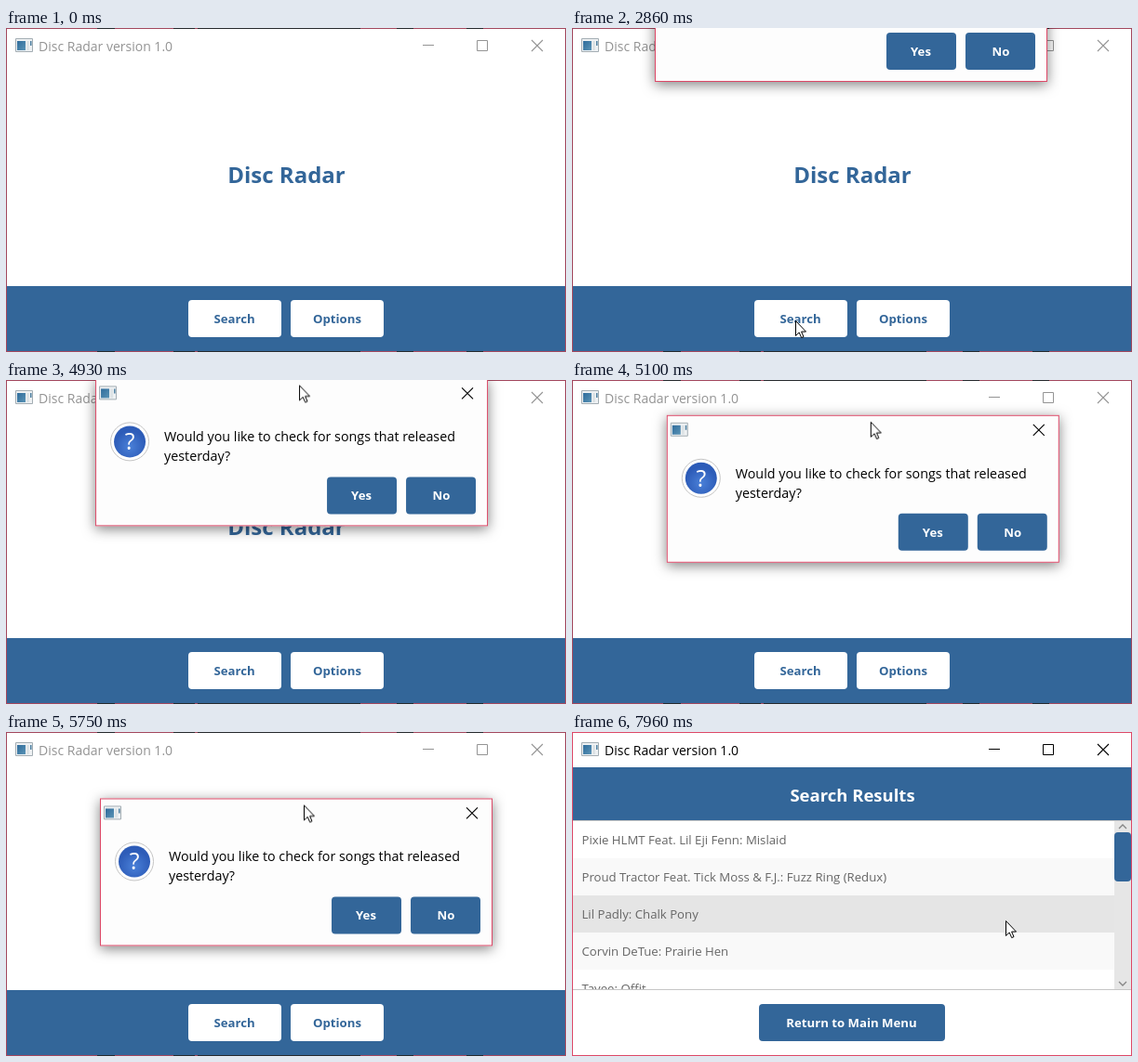
These frames come from a looping animation (602 px wide and 349 px high, 8 s). An HTML page:

```html
<!DOCTYPE html>
<html lang="en">
<head>
<meta charset="utf-8">
<title>Disc Radar</title>
<style>
html, body { margin: 0; width: 100%; height: 100%; overflow: hidden; background: #fff; }
svg { display: block; width: 602px; height: 349px; }
text { font-family: "Open Sans", "Noto Sans", sans-serif; }
.bold { font-weight: 700; font-size: 13.2px; text-anchor: middle; }
.blue { fill: #336699; }
.white { fill: #fff; }
.line { fill: none; stroke: currentColor; }
.rows text { font-size: 13.2px; fill: #666; }

.chrome, .edge, .results, .drag, .fade, .cursor { animation: 8s linear infinite; }
.chrome { animation-name: chrome; }
.edge { animation-name: edge; }
.results { animation-name: results; }
.drag { animation-name: drag; }
.fade { animation-name: fade; transform-origin: 211px 79px; }
.cursor { animation-name: cursor; }

@keyframes chrome {
  0%, 23.49% { color: #949494; }
  23.5%, 30.875% { color: #000; }
  34.5%, 91.87% { color: #949494; }
  92.75%, 100% { color: #000; }
}
@keyframes edge {
  0%, 23.49% { opacity: 0; }
  23.5%, 30.875% { opacity: 1; }
  34.5%, 91.87% { opacity: 0; }
  92.5%, 100% { opacity: 1; }
}
@keyframes results {
  0%, 91.87% { visibility: hidden; }
  91.875%, 100% { visibility: visible; }
}
@keyframes fade {
  0%, 30.8% { opacity: 0; transform: scale(.92); animation-timing-function: ease-out; }
  34.5%, 91.8% { opacity: 1; transform: none; }
  92.75%, 100% { opacity: 0; transform: scale(.96); }
}
@keyframes drag {
  0%, 59.5% { transform: translate(89px, -101px); animation-timing-function: cubic-bezier(.35, 0, .75, .75); }
  61.625% { transform: translate(96px, -2px); animation-timing-function: cubic-bezier(.2, .5, .6, .9); }
  65.875% { transform: translate(104px, 53px); animation-timing-function: ease-out; }
  68.375%, 69.5% { transform: translate(101px, 68px); }
  72.25%, 100% { transform: translate(101px, 72px); }
}
@keyframes cursor {
  0%, 12.7% { transform: translate(249px, 351px); animation-timing-function: cubic-bezier(.3, .4, .5, 1); }
  19.125%, 42.9% { transform: translate(240px, 315px); animation-timing-function: cubic-bezier(.5, .1, .8, .9); }
  46.1% { transform: translate(281px, 1px); }
  46.375% { transform: translate(285px, -24px); }
  47.5%, 59.5% { transform: translate(308px, -94px); animation-timing-function: cubic-bezier(.35, 0, .75, .75); }
  61.625% { transform: translate(315px, 5px); animation-timing-function: cubic-bezier(.2, .5, .6, .9); }
  65.875% { transform: translate(323px, 60px); animation-timing-function: ease-out; }
  68.375%, 69.5% { transform: translate(320px, 75px); }
  72.25%, 77.1% { transform: translate(320px, 79px); animation-timing-function: cubic-bezier(.4, .2, .5, 1); }
  80%, 81.6% { transform: translate(509px, 210px); animation-timing-function: ease-in-out; }
  87.625%, 97% { transform: translate(492px, 203px); animation-timing-function: ease-in-out; }
  99.5%, 100% { transform: translate(466px, 203px); }
}
</style>
</head>
<body>
<svg viewBox="0 0 602 349">
  <defs>
    <linearGradient id="pane" x2="1" y2="1">
      <stop stop-color="#2f6c9c"/><stop offset="1" stop-color="#5a93b5"/>
    </linearGradient>
    <radialGradient id="ball" cy=".65">
      <stop stop-color="#4a80d8"/><stop offset="1" stop-color="#2d5cb8"/>
    </radialGradient>
    <clipPath id="list"><path d="M1 96H583V277H1Z"/></clipPath>
    <g id="icon">
      <path d="M.5 .5H18.5V14.5H.5Z" fill="#eef1f3" stroke="#a3adb3"/>
      <path d="M2 3H11V13H2Z" fill="url(#pane)"/>
      <path d="M12 3H15V13H12Z" fill="#dde3e6"/>
      <path d="M16 3H17.5V8H16Z" fill="#4d7fa0"/>
    </g>
    <path id="cross" class="line" stroke-width="1.1" d="M-6 -6L6 6M6 -6L-6 6"/>
  </defs>

  <rect class="white" width="602" height="349"/>

  <g class="chrome">
    <use href="#icon" x="10" y="11"/>
    <text x="35" y="24.5" font-size="14" fill="currentColor">Disc Radar version 1.0</text>
    <path class="line" d="M448 18.5H460M506.5 13.5H517.5V24.5H506.5Z"/>
    <use href="#cross" x="571" y="19"/>
  </g>

  <g class="home">
    <text class="bold blue" x="301.5" y="167" style="font-size:24px">Disc Radar</text>
    <rect class="blue" y="278" width="602" height="71"/>
    <rect class="white" x="196" y="293" width="100" height="40" rx="4"/>
    <rect class="white" x="306" y="293" width="100" height="40" rx="4"/>
    <text class="bold blue" x="245.5" y="318">Search</text>
    <text class="bold blue" x="356" y="318">Options</text>
  </g>

  <g class="results">
    <rect class="white" y="38" width="602" height="311"/>
    <rect class="blue" y="38" width="602" height="57"/>
    <text class="bold white" x="301.5" y="75" style="font-size:18.5px">Search Results</text>
    <g class="rows" clip-path="url(#list)">
      <path fill="#f9f9f9" d="M1 136H583V176H1ZM1 216H583V256H1Z"/>
      <path fill="#e5e5e5" d="M1 176H583V216H1Z"/>
      <text x="10.5" y="121">Pixie HLMT Feat. Lil Eji Fenn: Mislaid</text>
      <text x="10.5" y="161">Proud Tractor Feat. Tick Moss &amp; F.J.: Fuzz Ring (Redux)</text>
      <text x="10.5" y="201">Lil Padly: Chalk Pony</text>
      <text x="10.5" y="241">Corvin DeTue: Prairie Hen</text>
      <text x="10.5" y="281">Tavee: Offit</text>
    </g>
    <path fill="#e6e6e6" d="M583 96H601V277H583Z"/>
    <rect class="blue" x="583" y="108" width="18" height="53" rx="4"/>
    <path fill="none" stroke="#858585" stroke-width="1.3" d="M588 104L592 100L596 104M588 269L592 273L596 269"/>
    <path fill="none" stroke="#c6c6c6" d="M1 95.5H601M1 277.5H601"/>
    <rect class="blue" x="201" y="293" width="200" height="40" rx="4"/>
    <text class="bold white" x="300.5" y="318">Return to Main Menu</text>
  </g>

  <g fill="none">
    <rect x=".5" y=".5" width="601" height="348" stroke="#a3475d"/>
    <path stroke="#26292d" d="M98 .5H117M180 .5H203M206 .5H381M420 .5H438M495 .5H513M98 348.5H117M180 348.5H203M206 348.5H381M420 348.5H438M495 348.5H513"/>
    <rect class="edge" x=".5" y=".5" width="601" height="348" stroke="#dd4867"/>
  </g>

  <g class="drag">
    <g class="fade">
      <rect width="422" height="159" fill="#fdfdfd" style="filter:drop-shadow(0 3px 7px rgba(0,0,0,.5))"/>
      <rect x=".5" y=".5" width="421" height="158" fill="none" stroke="#dd4867"/>
      <use href="#icon" x="4" y="8"/>
      <use href="#cross" x="400" y="16"/>
      <circle cx="37" cy="68" r="20.5" fill="#fff" stroke="#c4c4c4"/>
      <circle cx="37" cy="68" r="17" fill="url(#ball)"/>
      <text class="white" x="37" y="77" font-size="25" text-anchor="middle">?</text>
      <g font-size="14.3">
        <text x="74" y="68">Would you like to check for songs that released</text>
        <text x="74" y="89">yesterday?</text>
      </g>
      <rect class="blue" x="249" y="106" width="75" height="40" rx="4"/>
      <rect class="blue" x="334" y="106" width="75" height="40" rx="4"/>
      <text class="bold white" x="286" y="131">Yes</text>
      <text class="bold white" x="372" y="131">No</text>
    </g>
  </g>

  <path class="cursor" fill="#fff" stroke="#000" d="M.5 .5V16.5L4.2 13L6.7 18.6L9 17.6L6.6 12.1H11.5Z"/>
</svg>
</body>
</html>
```
